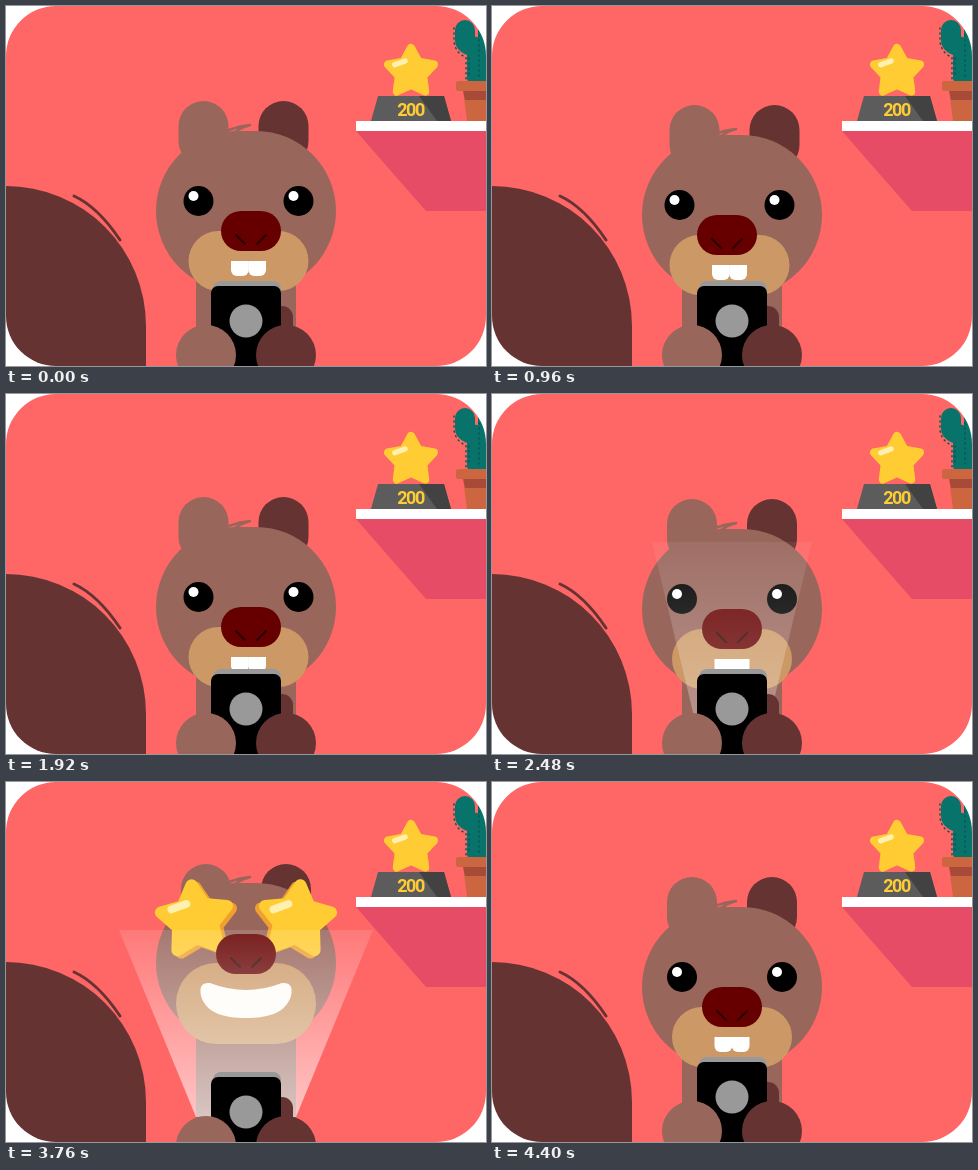
An HTML page with a canvas that plays this animation: 480 by 360 pixels, repeating every 4480 ms.

```html
<!DOCTYPE html>
<html lang="en">
<head>
<meta charset="utf-8">
<title>Reading beaver</title>
<style>
  html, body { margin: 0; width: 480px; height: 360px; overflow: hidden; background: #fff; }
  canvas { display: block; border-radius: 50px; }
</style>
</head>
<body>
<canvas id="stage" width="480" height="360"></canvas>
<script>
const c = document.getElementById('stage').getContext('2d');
const LOOP = 4480, STEP = 80;
const FUR = '#99665c', DARK = '#663333';

// Vertical places first, then sizes and switches.
const FIELDS = ['ears', 'head', 'eyes', 'nose', 'muzzle', 'teeth', 'halfW', 'muzzleH', 'drop', 'open', 'grin'];
const READ  = [95, 205, 195, 225, 225, 255, 60, 60,  0, 0, 0];
const SHOCK = [85, 190, 165, 190, 195, 225, 50, 75, 15, 1, 0];
const GRIN  = [82, 181, 138, 172, 181, 205, 70, 81, 15, 1, 1];

const lerp = (a, b, k) => a + (b - a) * k;
const mix = (a, b, k) => a.map((v, i) => lerp(v, b[i], k));
const span = (t, from, to) => Math.min(1, Math.max(0, (t - from) / (to - from)));
const smooth = (t, from, to) => { const k = span(t, from, to); return k * k * (3 - 2 * k); };
const back = k => 1 + 2.7 * (k - 1) ** 3 + 1.7 * (k - 1) ** 2;

function pose(t) {
  if (t >= 4080) return mix(GRIN, READ, smooth(t, 4080, 4320));
  if (t >= 3440) return mix(SHOCK, GRIN, back(span(t, 3440, 3680)));
  const dip = 10 * Math.min(1, t / 2400);
  const reading = READ.map((v, i) => i < 6 ? v + dip : v);
  return mix(reading, SHOCK, back(span(t, 2560, 2800)));
}

function box(color, x, y, w, h, r = 0) {
  c.fillStyle = color;
  c.beginPath();
  c.roundRect(x, y, w, h, r);
  c.fill();
}

function disc(color, x, y, r) {
  c.fillStyle = color;
  c.beginPath();
  c.arc(x, y, Math.max(0, r), 0, 7);
  c.fill();
}

function shape(color, d) {
  c.fillStyle = color;
  c.fill(new Path2D(d));
}

function line(color, width, d, dash = []) {
  c.strokeStyle = color;
  c.lineWidth = width;
  c.lineCap = 'round';
  c.setLineDash(dash);
  c.stroke(new Path2D(d));
  c.setLineDash([]);
}

function starShape(color, x, y, r, turn) {
  c.beginPath();
  for (let i = 0; i < 10; i++) {
    const a = turn + i * Math.PI / 5, q = i % 2 ? r * 0.53 : r;
    c.lineTo(x + q * Math.sin(a), y - q * Math.cos(a));
  }
  c.closePath();
  c.fillStyle = c.strokeStyle = color;
  c.lineWidth = r * 0.34;
  c.lineJoin = 'round';
  c.fill();
  c.stroke();
}

function star(x, y, r, turn, shade) {
  starShape('#f0a030', x + shade, y + Math.abs(shade) * 0.6, r, turn);
  starShape('#ffcc33', x, y, r, turn);
  c.save();
  c.translate(x - r * 0.46, y - r * 0.38);
  c.rotate(-0.35);
  box('#fff0b0', -r * 0.34, -r * 0.11, r * 0.68, r * 0.22, r * 0.11);
  c.restore();
}

function room() {
  box('#ff6666', 0, 0, 480, 360);

  shape('#e64c66', 'M350 125H480V205H420Z');
  box('#fff', 350, 115, 130, 10);

  star(405, 66, 24, 0, 0);
  shape('#5c5c5c', 'M372 90H438L445 115H365Z');
  shape('#424242', 'M413 90H438L445 115H431Z');
  c.fillStyle = '#ffcc33';
  c.font = 'bold 18px Roboto, Arial, sans-serif';
  c.letterSpacing = '-1.5px';
  c.textAlign = 'center';
  c.fillText('200', 404.5, 110);

  line('#08736b', 20, 'M459 24V34Q459 40 475 42');
  box('#08736b', 461, 36, 30, 40, 4);
  box('#08736b', 472, 14, 24, 60, 12);
  line('#07564f', 1.5, 'M448 22V36Q450 48 460 51V74M463 52V72M473 24V72', [1, 4]);
  shape('#cc6640', 'M457 84H480V115H461Z');
  shape('#a84a38', 'M457 84H480V94H459Z');
  box('#cc6640', 450, 75, 36, 10, 2);

  shape(DARK, 'M0 180A140 140 0 0 1 140 320V360H0Z');
  line(DARK, 3, 'M68 190Q92 201 114 234');
}

function beam(t) {
  const wide = span(t, 2400, 2560);
  const alpha = wide * (1 - smooth(t, 4080, 4240));
  if (!alpha) return;
  const light = c.createLinearGradient(0, 140, 0, 335);
  light.addColorStop(0, 'rgba(255,255,255,.1)');
  light.addColorStop(1, 'rgba(255,255,255,.62)');
  const far = lerp(33, 127, wide), near = lerp(20, 50, wide);
  c.globalAlpha = alpha;
  shape(light, `M${240 - far} 148H${240 + far}L${240 + near} 335H${240 - near}Z`);
  c.globalAlpha = 1;
}

function mouth(x, y, open, grin) {
  if (grin < 0.5) {
    c.save();
    c.beginPath();
    c.arc(x, y + 15, Math.max(15, lerp(28, 15, open)), 0, 7);
    c.clip();
    disc('#333', x, y + 15, 15 * open);
    box('#fff', x - 17.5, y, 17.7, 15, [0, 0, 6, 6]);
    box('#fff', x - 0.2, y, 17.7, 15, [0, 0, 6, 6]);
    c.restore();
  }
  if (grin > 0.05) {
    c.save();
    c.translate(x, y + 14);
    c.scale(grin, grin);
    shape('#fffdfa', 'M-36 -18Q0 -4 36 -18Q48 -19 45 -5C40 12 22 17 0 17S-40 12 -45 -5Q-48 -19 -36 -18Z');
    c.restore();
  }
}

function beaver(t) {
  const p = Object.fromEntries(pose(t).map((v, i) => [FIELDS[i], v]));
  const look = 1 - 2 * smooth(t, 360, 720) + 2 * smooth(t, 1280, 1640) - smooth(t, 2160, 2440);
  const face = 240 + 2.5 * look, ears = 240 - 2.5 * look, nose = 240 + 5 * look;
  const top = p.head - 80;

  box(FUR, ears - 65, p.ears, 50, 65, 25);
  box(DARK, ears + 15, p.ears, 50, 65, 25);
  line(FUR, 2.5, `M223 ${top - 1}Q233 ${top - 5} 244 ${top - 6}M229 ${top + 1}Q236 ${top - 4} 244 ${top - 6}`);

  box(FUR, 190, 230, 100, 130);
  box(FUR, 150, top, 180, 160, 80);
  box('#cc9966', face - p.halfW, p.muzzle, 2 * p.halfW, p.muzzleH, p.muzzleH / 2);

  for (const side of [-1, 1]) {
    const x = face + 50 * side;
    if (p.grin < 0.5) {
      disc('#000', x, p.eyes, 15);
      disc('#fff', x - 5, p.eyes - 5, 5);
    }
    if (p.grin > 0.05) star(x + side, p.eyes, 35 * p.grin, 0.1 * side, -4 * side * p.grin);
  }

  box('#660000', nose - 30, p.nose - 20, 60, 40, 20);
  line('#2a0000', 2, `M${nose - 15} ${p.nose + 4}l9 9M${nose + 15} ${p.nose + 4}l-9 9`);

  beam(t);
  mouth(face, p.teeth, p.open, p.grin);

  c.save();
  c.translate(0, p.drop);
  box(DARK, 258, 300, 29, 60, 11);
  box('#999', 207, 275, 68, 80, 8);
  box('#000', 205, 280, 70, 100, 7);
  disc('#999', 240, 315, 16.5);
  box(FUR, 170, 319, 60, 60, 30);
  box(DARK, 250, 319, 60, 60, 30);
  c.restore();
}

function draw(now) {
  const t = Math.floor((now % LOOP) / STEP) * STEP;
  room();
  beaver(t);
  requestAnimationFrame(() => draw(performance.now() - start));
}

const start = performance.now();
draw(0);
</script>
</body>
</html>
```
